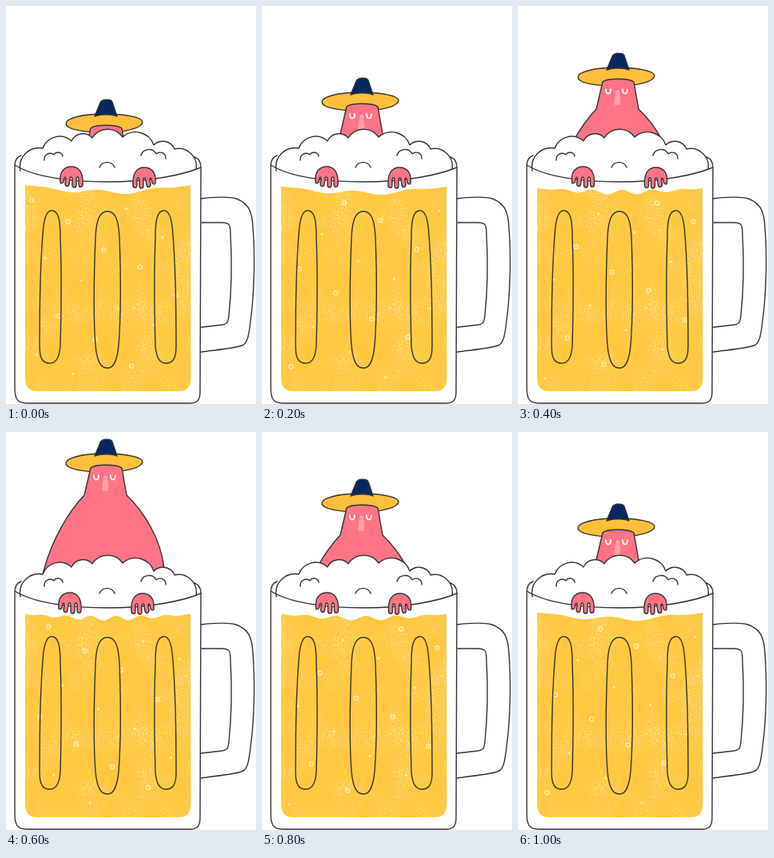
Recreate the animation shown at these times as an HTML page. Size 313 by 498 pixels, loop 1.2 s.

```html
<!DOCTYPE html>
<html lang="en">
<head>
<meta charset="utf-8">
<title>Beer bath</title>
<style>
  html, body { margin: 0; width: 100%; height: 100%; overflow: hidden; background: #fff; }
  svg { display: block; width: 100%; height: 100%; }
  .line { fill: none; stroke: #333; stroke-width: 1.4; stroke-linecap: round; stroke-linejoin: round; }
  .beer { fill: #ffc840; }
  .brim { fill: #fec03c; }
  .skin { fill: #ff7487; }
  .navy { fill: #06285f; }
  .white { fill: #fff; }
  .nose { fill: #ff9ea8; }
  .ring { fill: none; stroke: #fff0c4; stroke-width: 1.2; }
  .dot { fill: #ffeab0; }
  .eye { fill: none; stroke: #fff; stroke-width: 1.7; stroke-linecap: round; }
</style>
</head>
<body>
<svg viewBox="0 0 313 498" preserveAspectRatio="none">
  <defs>
    <filter id="pencil" filterUnits="userSpaceOnUse" x="0" y="0" width="313" height="498" color-interpolation-filters="sRGB">
      <feTurbulence type="fractalNoise" baseFrequency=".4" numOctaves="2" seed="4"/>
      <feDisplacementMap in="SourceGraphic" scale="1.3" xChannelSelector="R" yChannelSelector="G"/>
    </filter>
    <!-- fine specks gathered in soft patches -->
    <filter id="grain" x="0" y="0" width="1" height="1" color-interpolation-filters="sRGB">
      <feTurbulence type="fractalNoise" baseFrequency=".7" numOctaves="2" seed="9"/>
      <feColorMatrix values="0 0 0 0 1  0 0 0 0 .96  0 0 0 0 .85  5 0 0 0 -2.6" result="specks"/>
      <feTurbulence type="fractalNoise" baseFrequency=".025" numOctaves="2" seed="3"/>
      <feColorMatrix values="0 0 0 0 0  0 0 0 0 0  0 0 0 0 0  2 0 0 0 -.75" result="patches"/>
      <feComposite in="specks" in2="patches" operator="in"/>
      <feComposite in2="SourceAlpha" operator="in" result="texture"/>
      <feMerge><feMergeNode in="SourceGraphic"/><feMergeNode in="texture"/></feMerge>
    </filter>
    <clipPath id="above"><path d="M0 0H313V186H0Z"/></clipPath>
    <path id="groove" d="M57 256C66 256 68 268 68 290C70 340 69 390 68 425C67 440 63 447 55 447C45 447 42 440 42 425C42 380 43 320 46.500 280C48 264 51 256 57 256Z"/>
    <path id="hand" d="M68 219C67 207 73 201 82 201C91 201 97 208 96 223C96 227 91 228 91 223V217C91 213 88 213 88 217V224C88 228 83 228 83 224V217C83 213 80 213 80 217L79 223C78 227 74 226 74 222L75 217C75 213 73 213 72.500 218C72 223 67 223 68 219Z"/>
  </defs>
  <g filter="url(#pencil)">
    <g id="poses"></g>
    <g class="line">
      <path d="M19 187C13 189 11 193 11 200V478C11 491 14 497 26 497H230C240 497 243 493 243 482L244 202C244 195 242 191 236 189"/>
      <path d="M11 199C35 214 80 220 127 220C178 220 220 212 244 202"/>
      <path d="M244 241C260 239 276 238 288 241C302 246 308 255 309 275C312 310 311 360 306 395C304 413 302 423 295 425C286 428 266 430 244 433"/>
      <path d="M245 271H270C279 271 281 273 281 284C283 320 282 360 279 388C278 396 277 398 270 399L244 402"/>
      <use href="#groove"/>
      <use href="#groove" transform="translate(255) scale(-1 1)"/>
      <path d="M127 257C137 257 141 268 142 290C144 340 144 385 141 425C139 444 135 453 127 453C118 453 114 444 112 425C109 385 110 340 112 290C113 268 117 257 127 257Z"/>
    </g>
    <g id="hands"></g>
  </g>
</svg>
<script>
const STEP = 200, ORDER = [0, 1, 2, 3, 2, 1];

// hat: top of the crown; level, sag, waves and dip shape the beer surface
const POSES = [
  { hat: 117, shift: 0, level: 224, sag: 9, waves: 2.8, dip: .26 },
  { hat: 90, shift: -1, level: 226, sag: 8, waves: 2.8, dip: .26 },
  { hat: 59, shift: -.5, level: 228, sag: 5, waves: 5.5, dip: .24 },
  { hat: 9, shift: -2, level: 228, sag: 5, waves: 6.6, dip: .17 }
];

const BODY = 'M106 36C111 31 139 31 145 36L151 70C172 90 194 124 198 162L202 200H40L47 165C58 124 79 90 98 70Z';
const CROWN = 'M111 21L118 4C120 -1 131 -1 133 3L139 21C132 18 119 18 111 21Z';
const BRIM = 'M75 30C75 24 94 18 123 18C152 18 171 23 171 28C171 35 152 41 123 41C95 41 75 37 75 30Z';
const FOAM = [[18, 206], [46, 178], [82, 169], [108, 165], [146, 164], [185, 174], [211, 179], [238, 204]];
const CURLS = [[[48, 193], [60, 186], [71, 188]], [[169, 187], [188, 185], [200, 191]], [[117, 202], [136, 202]]];

const path = (cls, d, more = '') => `<path class="${cls}" d="${d}" ${more}/>`;
const both = (cls, d, more) => path(cls, d, more) + path('line', d);

// chain of arcs through the points; a smaller ratio gives rounder arcs
function arcs(points, ratio) {
  return points.map(([x, y], i) => {
    if (!i) return `M${x} ${y}`;
    const r = Math.hypot(x - points[i - 1][0], y - points[i - 1][1]) * ratio;
    return `A${r} ${r} 0 0 1 ${x} ${y}`;
  }).join('');
}

function beer({ level, sag, waves, dip }) {
  let d = '';
  for (let x = 24; x <= 231; x += 3) {
    const u = (x - 24) / 207;
    const y = level + Math.sin(Math.PI * u) * (sag + 3 * Math.cos(2 * Math.PI * waves * (u - dip)));
    d += `${d ? 'L' : 'M'}${x} ${y.toFixed(1)}`;
  }
  return d + 'L231.500 464C231 477 227 482 217 482H39C28 482 24 476 24 464Z';
}

function bubbles(k) {
  let out = '';
  for (let i = 0; i < 16; i++) {
    const x = 32 + 192 * ((i * .618 + k * .37) % 1), y = 243 + i * 14.6 + 4 * Math.sin(i * 5 + k);
    out += `<circle class="${i % 2 ? 'dot' : 'ring'}" cx="${x}" cy="${y}" r="${i % 2 ? 1.6 : 2.5}"/>`;
  }
  return out;
}

function bather(hat) {
  const eye = x => path('eye', `M${x - 3} 45C${x - 3} 52.500 ${x + 3} 52.500 ${x + 3} 45`);
  return `<g clip-path="url(#above)"><g transform="translate(0 ${hat})">
    ${both('brim', BRIM)}
    ${both('navy', CROWN)}
    ${both('skin', BODY)}
    ${path('nose', 'M122 47C122 45 126 45 127 47L128.500 63C128 66 120 66 120 63Z')}
    ${eye(113)}${eye(134)}
  </g></g>`;
}

function scene(p, k) {
  return bather(p.hat) +
    both('white', arcs(FOAM, .6)) +
    path('line', CURLS.map(c => arcs(c, .54)).join('')) +
    path('beer', beer(p), 'filter="url(#grain)"') +
    bubbles(k);
}

function hands({ shift }) {
  const hand = t => `<g transform="${t}"><use href="#hand" class="skin"/><use href="#hand" class="line"/></g>`;
  return hand(`translate(${shift} 0)`) + hand(`translate(${255 + shift} 1) scale(-1 1)`);
}

function flip(id, html, k) {
  const g = document.createElementNS('http://www.w3.org/2000/svg', 'g');
  g.innerHTML = html;
  document.getElementById(id).append(g);
  const frames = [...ORDER, ORDER[0]].map((n, i) => ({
    opacity: n === k ? 1 : 0, offset: i / ORDER.length, easing: 'steps(1, end)'
  }));
  g.animate(frames, { duration: STEP * ORDER.length, iterations: Infinity });
}

POSES.forEach((p, k) => {
  flip('poses', scene(p, k), k);
  flip('hands', hands(p), k);
});
</script>
</body>
</html>
```
